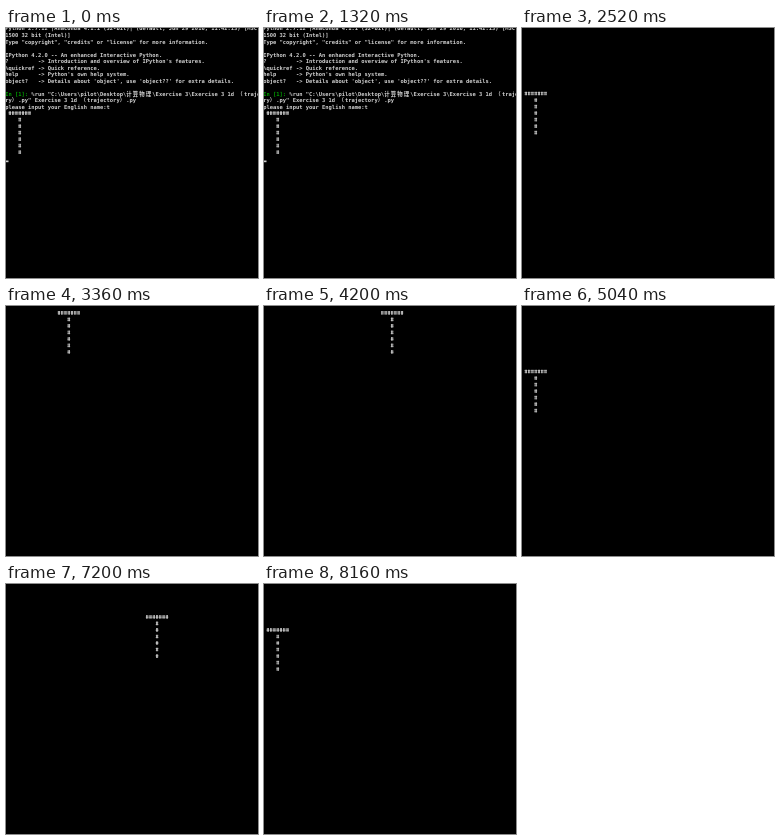
Write an HTML page with a canvas that moves like this. It is 252 by 250 pixels and loops after 8520 ms.

```html
<!DOCTYPE html>
<html lang="en">
<head>
<meta charset="utf-8">
<title>Console letter</title>
<style>
html, body { margin: 0; width: 100%; height: 100%; overflow: hidden; background: #000; }
canvas { display: block; }
</style>
</head>
<body>
<canvas id="stage" width="252" height="250"></canvas>
<script>
const ctx = document.getElementById('stage').getContext('2d');
const LOOP = 8520, TICK = 120;
const CELL_W = 3.27, CELL_H = 6.52, DOT = CELL_W / 8;
const GRAY = '#d0d0d0';
const colX = col => col * CELL_W - 0.8;
const rowY = row => 5 + (row - 1) * CELL_H;

const lines = [
  'Python 2.7.12 |Anaconda 4.1.1 (32-bit)| (default, Jun 29 2016, 11:42:13) [MSC v.',
  '1500 32 bit (Intel)]',
  'Type "copyright", "credits" or "license" for more information.',
  '',
  'IPython 4.2.0 -- An enhanced Interactive Python.',
  "?         -> Introduction and overview of IPython's features.",
  '%quickref -> Quick reference.',
  "help      -> Python's own help system.",
  "object?   -> Details about 'object', use 'object??' for extra details.",
  '',
  'In [1]: %run "C:\\Users\\pilot\\Desktop\\计算物理\\Exercise 3\\Exercise 3 1d （trajecto',
  'ry）.py" Exercise 3 1d （trajectory）.py',
  'please input your English name:t'
];

function drawLine(text, row) {
  const promptEnd = text.startsWith('In [') ? 7 : 0;
  let col = 0;
  for (const ch of text) {
    ctx.fillStyle = col < promptEnd ? '#00a000' : GRAY;
    ctx.fillText(ch, colX(col), rowY(row) + 4);
    col += ch > '\u00ff' ? 2 : 1;
  }
}

// A hash sign on an 8-dot-wide raster cell: two uprights, two crossbars
function drawHash(col, row) {
  const x = colX(col), y = rowY(row);
  ctx.beginPath();
  for (const i of [1, 4]) ctx.rect(x + i * DOT, y, 2 * DOT, 9 * DOT);
  for (const i of [2, 6]) ctx.rect(x, y + i * DOT, 7 * DOT, DOT);
  ctx.fillStyle = GRAY;
  ctx.fill();
}

function drawLetter(col, row) {
  for (let i = 0; i < 7; i++) drawHash(col + i, row);
  for (let i = 1; i < 7; i++) drawHash(col + 3, row + i);
}

function drawConsole(t) {
  lines.forEach(drawLine);
  drawLetter(1, 13);
  if (t < 720 || t >= 1320) {
    ctx.fillStyle = GRAY;
    ctx.fillRect(0, 132.5, 2.5, 1.7);
  }
}

// The letter jumps about every 3.57 ticks; -1 while the console is shown
const stepAt = t => Math.ceil((Math.floor(t / TICK) - 13.155) / 3.57) - 1;

function drawStep(step) {
  const n = step + 1;
  const col = n * Math.floor(3 + 3 * Math.cos(n));
  const row = Math.max(0, Math.floor(10 * Math.sin(step)));
  drawLetter(col + 1, row + 1);
}

const start = performance.now();
function frame() {
  const t = (performance.now() - start) % LOOP;
  const step = stepAt(t);
  ctx.fillStyle = '#000';
  ctx.fillRect(0, 0, 252, 250);
  ctx.font = 'bold 5.43px "DejaVu Sans Mono", "Noto Sans CJK SC", monospace';
  if (step < 0) drawConsole(t);
  else drawStep(step);
  requestAnimationFrame(frame);
}
frame();
</script>
</body>
</html>
```
